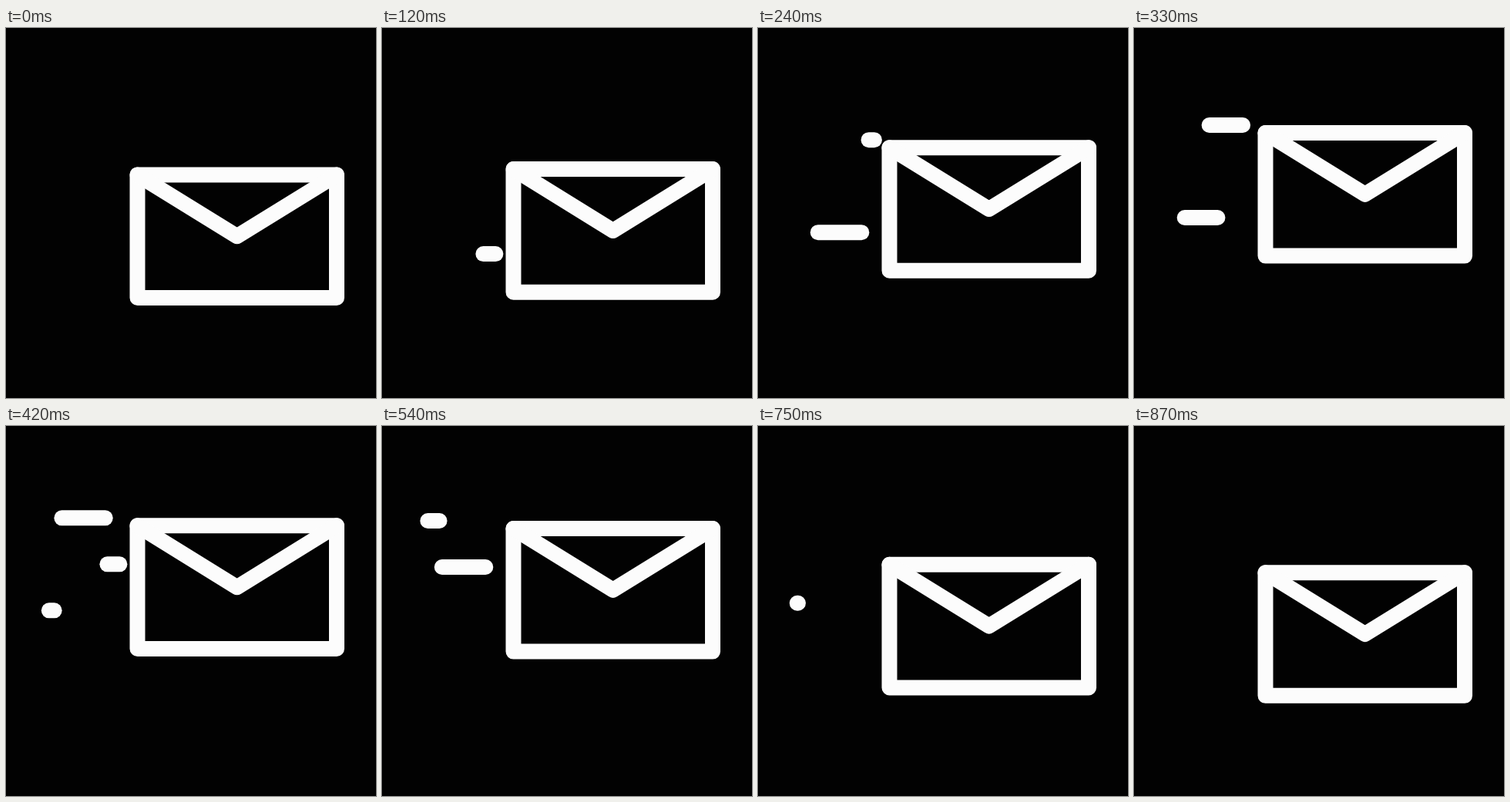
These frames come from a looping animation (480x480 px, 0.9 s). An HTML page:

```html
<!DOCTYPE html>
<html lang="en">
<head>
<meta charset="utf-8">
<title>Flying envelope</title>
<style>
  html, body { margin: 0; width: 100%; height: 100%; overflow: hidden; background: #020202; }
  svg { display: block; width: 100vw; height: 100vh; }
  g { fill: none; stroke: #fcfcfc; stroke-width: 20; stroke-linecap: round; stroke-linejoin: round; }
</style>
</head>
<body>
<svg viewBox="0 0 480 480">
  <g id="mail">
    <path d="M170.5 190.4H429V350H170.5Z"/>
    <path d="M170.5 190.4L299.7 270.2L429 190.4"/>
  </g>
</svg>
<script>
const LOOP = 900, PEAK = 450, END = 890, LIFT = 61.4;

// Streaks: vertical place and delay; all share one motion.
const STREAKS = [
  { y: 300.4, delay: 0 },
  { y: 180.4, delay: 150 },
  { y: 240.4, delay: 300 },
];
const SHOW = 45, HIDE = 465, STEP = 30, FIRST = 60;
const HEAD = [155, 144, 132, 114, 98, 86, 78, 72.5, 69, 65.8, 62.5, 59.5, 56, 50.8];

const mail = document.getElementById('mail');
for (const s of STREAKS) {
  s.el = document.createElementNS(mail.namespaceURI, 'path');
  mail.append(s.el);
}

const clamp = (v, lo, hi) => Math.min(hi, Math.max(lo, v));

// Cubic bezier ease with handles (a, 0) and (1 - a, 1).
function ease(x, a = 0.52) {
  let lo = 0, hi = 1;
  for (let i = 0; i < 24; i++) {
    const s = (lo + hi) / 2, r = 1 - s;
    if (3 * a * s * r * r + 3 * (1 - a) * s * s * r + s ** 3 < x) lo = s;
    else hi = s;
  }
  return lo * lo * (3 - 2 * lo);
}

function lift(t) {
  return t < PEAK
    ? LIFT * ease(t / PEAK)
    : LIFT * (1 - ease(clamp((t - PEAK) / (END - PEAK), 0, 1)));
}

function head(t) {
  const p = clamp((t - FIRST) / STEP, 0, HEAD.length - 1);
  const i = Math.min(Math.floor(p), HEAD.length - 2);
  return HEAD[i] + (HEAD[i + 1] - HEAD[i]) * (p - i);
}

// The tail mirrors the head in place and time.
const tail = t => 207 - head(SHOW + HIDE - t);

function draw(t) {
  mail.setAttribute('transform', `translate(0 ${-lift(t)})`);
  for (const { el, y, delay } of STREAKS) {
    const p = t - delay;
    const on = p > SHOW && p < HIDE;
    el.setAttribute('d', on ? `M${head(p)} ${y}H${tail(p)}` : '');
  }
}

const start = performance.now();
function tick() {
  draw((performance.now() - start) % LOOP);
  requestAnimationFrame(tick);
}
tick();
</script>
</body>
</html>
```
